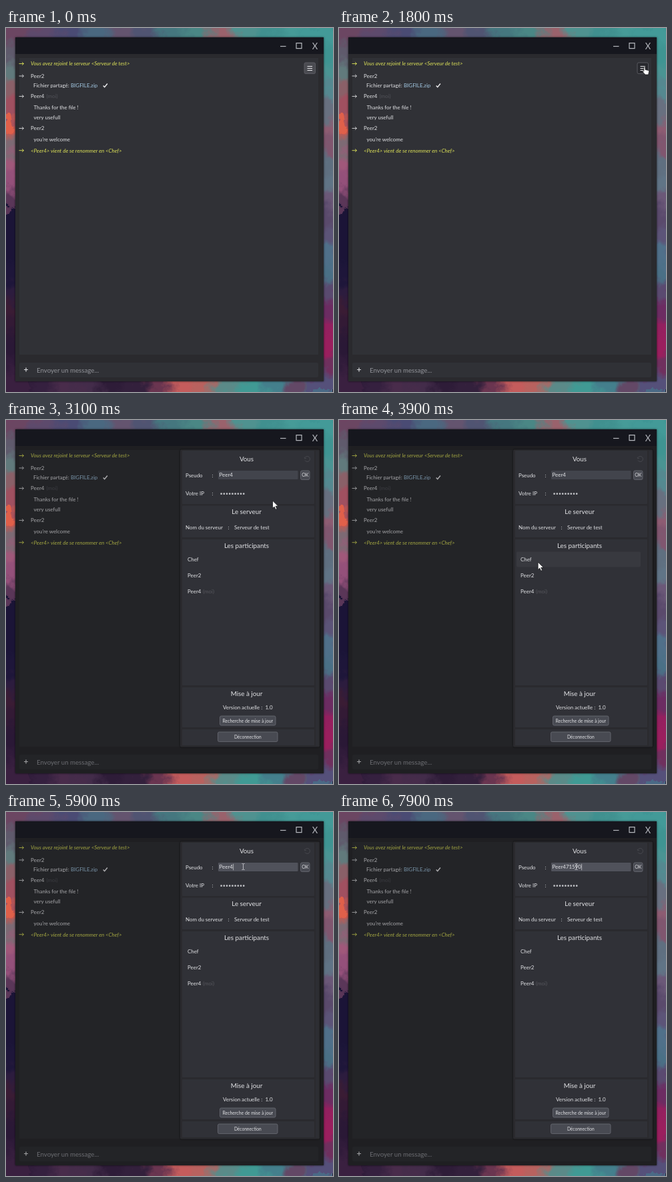
An HTML page that plays this animation: 490 by 546 pixels, repeating every 8000 ms.

```html
<!DOCTYPE html>
<html lang="fr">
<head>
<meta charset="utf-8">
<title>Messagerie</title>
<style>
  html, body { margin: 0; width: 100%; height: 100%; overflow: hidden; background: #30263f; }
  svg { display: block; width: 100vw; height: 100vh; }
  text { font-family: Lato, "Open Sans", sans-serif; font-size: 7.93px; fill: #e2e3e6; white-space: pre; }
</style>
</head>
<body>
<svg id="stage" viewBox="0 0 490 546" preserveAspectRatio="none">
  <defs>
    <filter id="paint" filterUnits="userSpaceOnUse" x="-20" y="-20" width="530" height="586" color-interpolation-filters="sRGB">
      <feTurbulence type="fractalNoise" baseFrequency=".045" numOctaves="5" seed="8" result="noise"/>
      <feDisplacementMap in="SourceGraphic" in2="noise" scale="48" xChannelSelector="R" yChannelSelector="G"/>
    </filter>
    <filter id="shadow" x="-10%" y="-10%" width="120%" height="120%">
      <feDropShadow dx="0" dy="0" stdDeviation="1.6" flood-color="#08080c" flood-opacity=".7"/>
    </filter>
  </defs>
  <g id="wallpaper" filter="url(#paint)"></g>
  <g id="app"></g>
  <rect id="dim" x="14" y="39" width="462" height="491" fill="#000"/>
  <g id="panel"></g>
  <g id="pointer"></g>
</svg>
<script>
const LOOP = 8000, STEP = 100;
const OPEN_START = 2100, OPEN_END = 2500;
const ME = 'Peer4', FRIEND = 'Peer2', OWNER = 'Chef';
const TYPED = '71590', KEY_TIMES = [6500, 6800, 7200, 7500, 7800];
const FOCUS_TIME = 5700;
const $ = id => document.getElementById(id);

function add(parent, tag, attrs, content) {
  const node = document.createElementNS('http://www.w3.org/2000/svg', tag);
  for (const key in attrs) node.setAttribute(key, attrs[key]);
  if (content !== undefined) node.textContent = content;
  parent.appendChild(node);
  return node;
}
const box = (parent, x, y, width, height, fill, more) =>
  add(parent, 'rect', { x, y, width, height, fill, ...more });
// y is the middle of the line
const label = (parent, x, y, content, more = {}) =>
  add(parent, 'text', { x, y: y + 2.8, ...more }, content);
const line = (parent, d, stroke, width = 1) =>
  add(parent, 'path', { d, stroke, fill: 'none', 'stroke-width': width });

function strip(name, x, y, w, h, colors) {
  const vertical = h > w;
  const grad = add(document.querySelector('defs'), 'linearGradient',
    { id: name, x1: 0, y1: 0, x2: vertical ? 0 : 1, y2: vertical ? 1 : 0 });
  const list = colors.split(' ');
  list.forEach((color, i) => {
    for (const part of [.3, .7])
      add(grad, 'stop', { offset: (i + part) / list.length, 'stop-color': '#' + color });
  });
  box($('wallpaper'), x, y, w, h, `url(#${name})`);
}

function drawWallpaper() {
  strip('top', 0, -30, 490, 80,
    '6d4462 5d4a6c 4a4b74 4a6880 64546f 505472 45777f 4a8785 9a626c 4f9290 40908f 469b98 3f9695');
  strip('bottom', 0, 490, 490, 90,
    '2a1734 35203f 492c4b 432c4a 2e1c38 33203c 6a3550 c45c5c b8625f 5b8a88 409a94 447f8c 634866 4a6a86');
  strip('left', -30, 0, 66, 546,
    '6b4662 5f5a6c 617a7c 8a6068 a05060 c8584f 7d6a74 a0587a 94507a 5a3658 1d1638 1a1436 1b1538 1e163a 2c1c3e 3a1c34 331a35 2a1836 301b3a 3a2040');
  strip('right', 454, 0, 66, 546,
    '439a98 3f9492 4a9493 558890 687080 8d5c72 80566f 5f6f80 607486 6b5878 5a4a6c 5c5478 50708a 4a7086 5a4a70 6c2c62 93205f 9a1f5e 6f305e 55507a');
  add($('wallpaper'), 'ellipse', { cx: 2, cy: 143, rx: 12, ry: 14, fill: '#e0604a' });
  box($('wallpaper'), -30, 268, 66, 80, '#1b1437');
}

function arrow(parent, y, color) {
  line(parent, `M19.5 ${y}h7m-2.4-2.2l2.4 2.2-2.4 2.2`, color, .9);
}

function drawApp() {
  const app = $('app');
  box(app, 14, 14, 462, 516, '#292a2f', { filter: 'url(#shadow)' });
  box(app, 14, 14, 462, 25, '#16171e');
  line(app, 'M411 27.5h8.5', '#b5b7bd', 1.2);
  line(app, 'M435 22.7h8v8h-8z', '#b5b7bd', 1.2);
  label(app, 463, 28.9, 'X', { 'text-anchor': 'middle', style: 'font-size:13px;fill:#b5b7bd' });
  box(app, 20, 45, 448, 445, '#303136');
  box(app, 20, 502, 448, 22, '#303136', { rx: 2 });
  line(app, 'M27 512.5h6m-3-3v6', '#d6d7da', 1.2);
  label(app, 46, 513.8, 'Envoyer un message...', { style: 'font-size:9.7px;fill:#92949a' });

  const yellow = '#dce158', italic = { 'font-style': 'italic', style: 'fill:' + yellow };
  arrow(app, 53.5, yellow);
  label(app, 37, 53.5, 'Vous avez rejoint le serveur <Serveur de test>', italic);
  [[72, FRIEND], [102.5, ME], [150.5, FRIEND]].forEach(([y, name]) => {
    arrow(app, y, '#d5d6d9');
    label(app, 37, y, name);
  });
  label(app, 60.5, 102.5, '(moi)', { style: 'fill:#505157' });
  label(app, 41, 86.5, 'Fichier partagé:');
  label(app, 97, 86, 'BIGFILE.zip', { style: 'fill:#a4cae5' });
  line(app, 'M145.7 86.5l2 2.2 4.2-5.2', '#f0f0f2', 1.4);
  label(app, 41.5, 118.8, 'Thanks for the file !');
  label(app, 41.5, 133.8, 'very usefull');
  label(app, 41.5, 167, "you're welcome");
  arrow(app, 183.7, yellow);
  label(app, 37, 183.7, `<${ME}> vient de se renommer en <${OWNER}>`, italic);

  const menu = box(app, 447, 52, 16.5, 16.5, '#4a4b51', { rx: 2, stroke: '#62636a', 'stroke-width': .8 });
  line(app, 'M451.5 57.5h7.5m-7.5 3h7.5m-7.5 3h7.5', '#e8e8eb', 1.2);
  return menu;
}

function button(parent, x, y, w, h, content, size) {
  box(parent, x, y, w, h, '#484a52', { rx: 2, stroke: '#6a6c74', 'stroke-width': .8 });
  label(parent, x + w / 2, y + h / 2 - .2, content, { 'text-anchor': 'middle', style: `font-size:${size}px` });
}

function drawPanel() {
  const panel = $('panel');
  box(panel, 261, 44.5, 209, 446, '#292a2f', { rx: 2, filter: 'url(#shadow)' });
  [[46, 80], [128.5, 47.5], [179, 219], [401, 60], [464, 24]].forEach(([y, h]) =>
    box(panel, 264, y, 198, h, '#303137', { rx: 1 }));
  box(panel, 464, 46, 4.5, 443, '#2d2e33');
  [['Vous', 58.5], ['Le serveur', 137.5], ['Les participants', 188.5], ['Mise à jour', 410.5]].forEach(([title, y]) =>
    label(panel, 360.5, y + .5, title, { 'text-anchor': 'middle', style: 'font-size:9.8px' }));
  line(panel, 'M448 56.5a4 4 0 1 1 0 4m-1-4.8l.8 2.2 2-.5', '#4a4b51', .9);

  label(panel, 269, 83, 'Pseudo');
  label(panel, 308.5, 83, ':');
  const field = box(panel, 318, 76, 119.5, 13, '#42444c', { rx: 1 });
  const value = label(panel, 319.5, 82.5, ME);
  const caret = box(panel, 342, 77.8, .7, 9.5, '#d8d9dc');
  button(panel, 441.5, 76, 13.5, 13.5, 'OK', 7);
  label(panel, 269, 110.5, 'Votre IP');
  label(panel, 308.5, 110.5, ':');
  for (let i = 0; i < 9; i++)
    add(panel, 'circle', { cx: 322.6 + i * 4.2, cy: 110.7, r: 1.35, fill: '#c1c2c6' });
  label(panel, 269, 161, 'Nom du serveur');
  label(panel, 332.5, 161, ':');
  label(panel, 342, 161, 'Serveur de test');

  const rows = [OWNER, FRIEND, ME].map((name, i) => {
    const y = 209 + i * 24;
    const row = box(panel, 266, y - 11.5, 186, 23, '#38393f', { rx: 2 });
    label(panel, 272, y, name);
    return row;
  });
  label(panel, 295, 257, '(moi)', { style: 'fill:#56575d' });
  label(panel, 325, 430.7, 'Version actuelle :');
  label(panel, 388.5, 430.7, '1.0');
  button(panel, 320.5, 444, 83.5, 14, 'Recherche de mise à jour', 6.9);
  button(panel, 317.5, 468, 89.5, 14.5, 'Déconnection', 6.6);
  return { panel, field, value, caret, rows };
}

function drawPointers() {
  const shape = (d, fill, stroke, width) =>
    add($('pointer'), 'path', { d, fill, stroke, 'stroke-width': width, 'stroke-linejoin': 'round' });
  return {
    arrow: shape('M0 0v11.5l2.6-2.4 1.9 4.2 2-.9-1.9-4.1h3.7z', '#fff', '#17181b', .8),
    hand: shape('M-1.2.5q1.2-1 2.2 0v4l4.5 1q1.2.4 1 2l-.8 4.5h-5l-4-5q.5-1.5 2.1-.2z', '#fff', '#17181b', .8),
    beam: shape('M-2-4.5h1.4l.6.6.6-.6h1.4M0-4v8M-2 4.5h1.4l.6-.6.6.6h1.4', 'none', '#d3d4d8', .8)
  };
}

const PATH = [
  [900, 500, 220], [1500, 458, 58], [2300, 458, 58], [3000, 399.5, 121], [3300, 399.5, 121],
  [3800, 300, 209], [4200, 288, 235], [4600, 282, 262], [4900, 282, 262],
  [5500, 355.5, 82], [LOOP, 355.5, 82]
];
const clamp = p => Math.max(0, Math.min(1, p));
const ease = p => p * p * (3 - 2 * p);

function pointerAt(t) {
  const next = Math.max(1, PATH.findIndex(point => point[0] > t));
  const [t0, x0, y0] = PATH[next - 1], [t1, x1, y1] = PATH[next];
  const p = ease(clamp((t - t0) / (t1 - t0)));
  return [x0 + (x1 - x0) * p, y0 + (y1 - y0) * p];
}

drawWallpaper();
const menu = drawApp(), ui = drawPanel(), pointers = drawPointers();
const show = (node, on) => node.setAttribute('visibility', on ? 'visible' : 'hidden');

function render(t) {
  const open = ease(clamp((t - OPEN_START) / (OPEN_END - OPEN_START)));
  const [x, y] = pointerAt(t);
  const inside = (left, top, w, h) => x >= left && x <= left + w && y >= top && y <= top + h;
  const isOpen = open === 1, onMenu = open === 0 && inside(447, 52, 17, 17);
  const onField = isOpen && inside(318, 76, 120, 13), focused = t >= FOCUS_TIME;

  $('dim').setAttribute('opacity', .27 * open);
  ui.panel.setAttribute('opacity', open);
  show(ui.panel, open > 0);
  menu.setAttribute('fill', onMenu ? '#27282d' : '#4a4b51');
  ui.rows.forEach((row, i) => row.setAttribute('opacity', isOpen && inside(266, 197.5 + i * 24, 186, 23) ? 1 : 0));

  ui.field.setAttribute('fill', focused ? '#50525b' : '#42444c');
  ui.value.textContent = ME + TYPED.slice(0, KEY_TIMES.filter(time => time <= t).length);
  ui.caret.setAttribute('opacity', focused ? 1 : 0);
  ui.caret.setAttribute('x', 320 + ui.value.getComputedTextLength());

  $('pointer').setAttribute('transform', `translate(${x} ${y})`);
  const kind = onField ? 'beam' : onMenu ? 'hand' : 'arrow';
  for (const name in pointers) show(pointers[name], t > PATH[0][0] && name === kind);
}

const start = performance.now();
function tick() {
  const t = (performance.now() - start) % LOOP;
  render(Math.floor(t / STEP) * STEP);
  requestAnimationFrame(tick);
}
tick();
</script>
</body>
</html>
```
